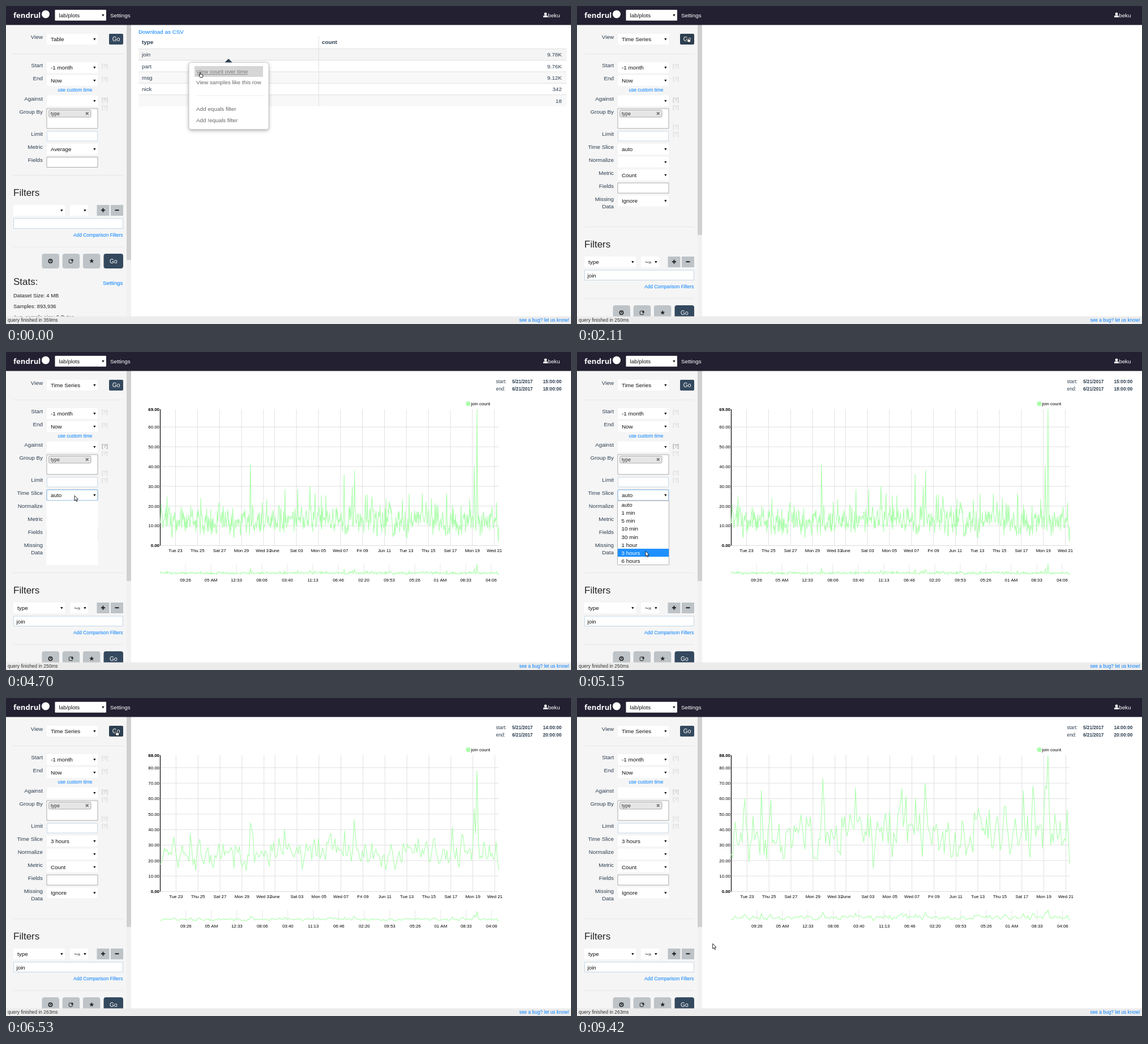
An HTML page with a canvas that plays this animation: 998 px wide and 561 px high, repeating every 9.46 s.

```html
<!DOCTYPE html>
<html lang="en">
<head>
<meta charset="utf-8">
<title>Query dashboard</title>
<style>
html, body { margin: 0; width: 100%; height: 100%; overflow: hidden; background: #fff; }
canvas { display: block; width: 100vw; height: 100vh; }
</style>
</head>
<body>
<canvas id="stage"></canvas>
<script>
const W = 998, H = 561, LOOP = 9460;
const canvas = document.getElementById('stage');
const ctx = canvas.getContext('2d');
const dpr = window.devicePixelRatio || 1;
canvas.width = W * dpr;
canvas.height = H * dpr;

const INK = '#2c3e50', LINK = '#007fff', NAVY = '#34495e', GREY = '#bdc3c7', GREEN = '#aaffaa';
const GRID = '#e1e1e1', DARK = '#222', FAINT = '#cfcfcf';
const SANS = '"Liberation Sans", Arial, sans-serif';
const BODY = 9.85, SMALL = 8.4;
const LEFT = 272.5, RIGHT = 870.5, TOP = 101, BOTTOM = 341.5;

// Moments at which the state changes
const PICK = 370, HOVER_GO = 1240, RUN = 2110, SHOWN = 2710, RELEASE = 3050,
  OPEN = 4700, CHOOSE = 5450, RERUN = 6360, LEAVE = 7030;

const mix = (a, b, f) => a + (b - a) * f;

// Drawing helpers
function rect(x, y, w, h, fill) {
  ctx.fillStyle = fill;
  ctx.fillRect(x, y, w, h);
}
function box(x, y, w, h, fill, stroke, r = 0) {
  ctx.beginPath();
  ctx.roundRect(x, y, w, h, r);
  if (fill) { ctx.fillStyle = fill; ctx.fill(); }
  if (stroke) { ctx.strokeStyle = stroke; ctx.lineWidth = 1; ctx.stroke(); }
}
function line(x1, y1, x2, y2, color, width = 1) {
  ctx.strokeStyle = color;
  ctx.lineWidth = width;
  ctx.beginPath();
  ctx.moveTo(x1, y1);
  ctx.lineTo(x2, y2);
  ctx.stroke();
}
function disc(x, y, r, fill) {
  ctx.fillStyle = fill;
  ctx.beginPath();
  ctx.arc(x, y, r, 0, 7);
  ctx.fill();
}
function triangle(x, y, halfWidth, height, fill) {
  ctx.fillStyle = fill;
  ctx.beginPath();
  ctx.moveTo(x - halfWidth, y);
  ctx.lineTo(x + halfWidth, y);
  ctx.lineTo(x, y + height);
  ctx.fill();
}
function text(s, x, y, { size = BODY, color = INK, align = 'left', bold = false, family = SANS } = {}) {
  ctx.font = `${bold ? 'bold ' : ''}${size}px ${family}`;
  ctx.fillStyle = color;
  ctx.textAlign = align;
  ctx.fillText(s, x, y);
}

// Seeded noise around a mean, with rare bursts and a few named peaks
function series({ count, mean, spread, burst, floor, seed, peaks }) {
  const rnd = () => (seed = (seed * 16807) % 2147483647) / 2147483647;
  let drift = 0;
  const values = Array.from({ length: count }, () => {
    drift = 0.35 * drift + (rnd() + rnd() + rnd() - 1.5) * spread;
    return Math.max(floor, mean + drift + burst * rnd() ** 12);
  });
  for (const [x, peak] of peaks) {
    const i = Math.round((x - LEFT) / (RIGHT - LEFT) * (count - 1));
    for (const k of [i - 1, i + 1]) if (k in values) values[k] = mix(values[k], peak, 0.35);
    values[i] = peak;
  }
  return values;
}

const hourly = {
  max: 69, min: 2, shift: 0, from: '15:00:00', to: '18:00:00',
  values: series({ count: 745, mean: 12, spread: 6.5, burst: 14, floor: 4, seed: 4711,
    peaks: [[432, 41], [537, 30], [597, 36], [616, 38], [827, 40], [832, 69], [870, 2]] })
};
const coarse = {
  max: 88, min: 15, shift: 0.8, from: '14:00:00', to: '20:00:00',
  values: series({ count: 249, mean: 37, spread: 14, burst: 22, floor: 21, seed: 2024,
    peaks: [[297, 60], [304, 19], [433, 73], [492, 67], [523, 15], [615, 70], [788, 65],
      [805, 68], [826, 68], [832, 88], [870, 18]] })
};

function dayLabel(date) {
  if (date.getUTCDate() === 1) return 'June';
  const name = date.getUTCDay() === 0 ? { month: 'short' } : { weekday: 'short' };
  return date.toLocaleDateString('en-US', { ...name, timeZone: 'UTC' }) +
    ' ' + String(date.getUTCDate()).padStart(2, '0');
}
function hourLabel(i) {
  const seconds = (34000 + 27200 * i) % 43200;
  const pad = n => String(Math.floor(n)).padStart(2, '0');
  const hour = pad(seconds / 3600 || 12), minute = pad(seconds % 3600 / 60);
  return minute === '00' ? hour + ' AM' : `${hour === '00' ? 12 : hour}:${minute}`;
}

function plot(values, toY) {
  ctx.strokeStyle = GREEN;
  ctx.lineWidth = 1.1;
  ctx.lineJoin = 'round';
  ctx.beginPath();
  values.forEach((v, i) => ctx.lineTo(mix(LEFT, RIGHT, i / (values.length - 1)), toY(v)));
  ctx.stroke();
}

function drawChart(c, values, alpha) {
  const toY = v => mix(BOTTOM, TOP, v / c.max);
  const tick = { size: 7.9, color: '#000', align: 'center' };
  const side = { ...tick, align: 'right' };
  ctx.globalAlpha = alpha;
  for (let v = 10; v < c.max - 5; v += 10) {
    line(LEFT, toY(v), RIGHT, toY(v), GRID);
    text(v.toFixed(2), 271, toY(v) + 2.8, side);
  }
  for (let d = 0; d < 30; d++) {
    const date = new Date(Date.UTC(2017, 4, 23 + d));
    if (date.getUTCDate() % 2 === 0) continue;
    const x = 299.5 + c.shift + 19.42 * d;
    line(x, TOP, x, BOTTOM, GRID);
    text(dayLabel(date), x, 353.3, tick);
  }
  line(LEFT, BOTTOM, RIGHT, BOTTOM, '#dcdcdc');
  line(LEFT, TOP, LEFT, BOTTOM, DARK, 1.4);
  for (const v of [c.max, 0]) text(v.toFixed(2), 271, toY(v) + 2.7, { ...side, bold: true });
  plot(values, toY);

  for (let i = 0; i < 13; i++) {
    const x = 317 + c.shift + 45 * i;
    line(x, 374, x, 393, '#e6e6e6');
    text(hourLabel(i), x, 405, tick);
  }
  plot(values, v => mix(393, 374, (v - c.min) / (c.max - c.min)));

  disc(816.5, 91.3, 4.1, GREEN);
  text('join count', 821.5, 94.2, { ...tick, align: 'left' });
  ctx.globalAlpha = 1;
}

function drawDates(c) {
  const row = (name, day, time, y) => {
    text(name, 865.5, y, { size: SMALL });
    text(day, 894, y, { size: 8.2, bold: true });
    text(time, 981.3, y, { size: 8.2, bold: true, align: 'right' });
  };
  row('start:', '5/21/2017', c.from, 54.5);
  row('end:', '6/21/2017', c.to, 68);
}

function drawTable(hover) {
  text('Download as CSV', 234, 49, { color: LINK });
  text('type', 240, 67.3, { bold: true });
  text('count', 558, 67.3, { bold: true });
  const rows = [['join', '9.78K'], ['part', '9.76K'], ['msg', '9.12K'], ['nick', '342'], ['', '18']];
  rows.forEach(([name, count], i) => {
    const y = 75.5 + i * 20.3;
    rect(234, y, 756, 20.3, hover === i ? '#f4f4f4' : i % 2 ? '#fff' : '#f8f8f8');
    line(234, y, 990, y, GRID);
    text(name, 240, y + 13.8);
    text(count, 981.7, y + 13.8, { align: 'right' });
  });
  line(552.5, 53, 552.5, 177, GRID);
}

function drawPopup() {
  ctx.save();
  ctx.shadowColor = 'rgba(0,0,0,.35)';
  ctx.shadowBlur = 6 * dpr;
  ctx.shadowOffsetY = 2 * dpr;
  box(323, 99.5, 141, 118, '#fff', null, 4);
  ctx.restore();
  box(323, 99.5, 141, 118, null, '#ccc', 4);
  triangle(393, 99.5, 6.5, -6.5, INK);
  rect(333, 106, 121, 19, '#d6d6d6');
  const gray = { color: '#666' };
  text('View count over time', 336, 119, { color: '#777' });
  line(336, 120.8, 427, 120.8, '#777', 0.8);
  text('View samples like this row', 336, 138.3, gray);
  line(336, 158, 457, 158, '#ececec');
  text('Add equals filter', 336, 185, gray);
  text('Add !equals filter', 336, 204.8, gray);
}

// Sidebar widgets, placed by their vertical centre
function select(x, y, w, label, stroke) {
  box(x, y - 9.5, w, 19, '#fff', stroke, 1);
  if (label) text(label, x + 7, y + 3.7, { color: '#111' });
  triangle(x + w - 5.6, y - 1.4, 2.2, 3.6, '#111');
}
function label(name, y) {
  text(name, 65, y - 0.1, { align: 'right' });
}
function choice(name, y, value, stroke) {
  label(name, y);
  select(72, y, 90, value, stroke);
}
function help(y, color = FAINT) {
  text('[?]', 174.5, y + 3.6, { color, align: 'center' });
}
function rule(y) {
  line(13, y, 207, y, '#e6e6e6');
}
function goButton(x, y, w, h, r, fill = NAVY) {
  box(x, y, w, h, fill, null, r);
  text('Go', x + w / 2, y + h / 2 + 3.7, { size: 10.3, color: '#fff', align: 'center' });
}
function signButton(x, y, plus) {
  rect(x, y, 22, 19, GREY);
  rect(x + 7.5, y + 8.2, 7, 2, DARK);
  if (plus) rect(x + 10, y + 5.7, 2, 7, DARK);
}
function star(x, y, r) {
  ctx.fillStyle = DARK;
  ctx.beginPath();
  for (let i = 0; i < 10; i++) {
    const d = i % 2 ? r * 0.4 : r, a = i * Math.PI / 5;
    ctx.lineTo(x + d * Math.sin(a), y - d * Math.cos(a));
  }
  ctx.fill();
}

function drawFilters(filled) {
  text('Filters', 13, 335.4, { size: 17, color: DARK });
  select(13, 360.5, 91, filled ? 'type' : '');
  select(113, 360.5, 32, filled ? '~=' : '');
  signButton(160.5, 351, true);
  signButton(185, 351, false);
  box(13.5, 375, 193, 17.5, '#fff', '#c3d6e4');
  if (filled) text('join', 18.5, 387.5, { color: '#111' });
  text('Add Comparison Filters', 206.5, 406.8, { size: SMALL, color: LINK, align: 'right' });
  rule(425);

  for (let i = 0; i < 3; i++) box(63.5 + 36.2 * i, 437, 30.5, 26, GREY, null, 4);
  disc(78.5, 450, 4, DARK);
  disc(78.5, 450, 2.4, GREY);
  rect(77.8, 448, 1.6, 2.8, DARK);
  box(111.3, 447, 6, 6.4, null, DARK, 1.5);
  triangle(117, 449.8, 2.4, -4, DARK);
  star(151.3, 450, 4.4);
  goButton(172.5, 437, 34.5, 26, 4);
}

function drawStats() {
  text('Stats:', 13, 491.6, { size: 17, color: DARK });
  text('Settings', 206.5, 492.3, { color: LINK, align: 'right' });
  ['Dataset Size: 4 MB', 'Samples: 893,936', 'Avg. sample size: 5 Bytes'].forEach((s, i) =>
    text(s, 13, 514 + i * 19, { size: 9.4, color: DARK }));
}

function drawGroupBy() {
  label('Group By', 190.3);
  box(72, 181, 90, 35, '#fff', '#aaa');
  box(75.5, 183.5, 74.5, 12.5, '#e6e6e6', '#aaa', 2);
  text('type', 79, 192.7, { size: SMALL, color: '#333' });
  line(141, 187.3, 145.6, 192, '#777', 1.7);
  line(141, 192, 145.6, 187.3, '#777', 1.7);
}

function drawSidebar(t) {
  const timed = t >= PICK;
  rect(0, 33, 213, 515, '#f5f5f5');
  rect(213, 33, 8, 515, '#f1f1f1');
  rect(213, 33, 8, timed ? 371 : 415, '#d0d0d0');

  choice('View', 58.5, timed ? 'Time Series' : 'Table');
  goButton(182, 49, 25, 19, 2, overButton(t) ? INK : NAVY);
  rule(84.5);
  choice('Start', 108.5, '-1 month');
  choice('End', 131.4, 'Now');
  text('use custom time', 152.5, 150.6, { size: SMALL, color: LINK, align: 'right' });
  choice('Against', 167.3);
  drawGroupBy();
  label('Limit', 229.5);
  box(72.5, 221, 89, 17, '#fff', '#c9d9e6');

  const lit = t > 4000 && t < 5700;
  [105, 128, 178].forEach(y => help(y));
  help(165.5, lit ? '#888' : FAINT);
  if (!lit) help(164.5);

  let y = 252.5;
  if (timed) {
    [212, 225].forEach(at => help(at));
    const focus = t >= OPEN && t < RERUN ? '#6aa5e0' : null;
    choice('Time Slice', y, t < CHOOSE ? 'auto' : '3 hours', focus);
    choice('Normalize', y + 22.8, '');
    choice('Missing', y + 91.2, 'Ignore');
    label('Data', y + 104.2);
    y += 45.6;
  }
  choice('Metric', y, timed ? 'Count' : 'Average');
  label('Fields', y + 22.8);
  box(72, y + 14, 90, 18, '#fff', '#aaa');

  ctx.save();
  if (timed) ctx.translate(0, 91);
  rule(298.5);
  drawFilters(timed);
  if (!timed) drawStats();
  ctx.restore();
}

function drawOptions(t, pointerY) {
  const top = 262.5, step = 14.1;
  rect(71.5, top, 91, 113.5, '#fff');
  if (t < OPEN + 40) return;
  const names = ['auto', '1 min', '5 min', '10 min', '30 min', '1 hour', '3 hours', '6 hours'];
  const active = Math.max(0, Math.floor((pointerY - top) / step));
  names.forEach((name, i) => {
    const y = top + i * step;
    if (i === active) rect(72, y, 90, step, '#1e90ff');
    text(name, 78.5, y + 10.6, { color: i === active ? '#fff' : '#111' });
  });
  box(71.5, top, 91, 113, null, '#b5b5b5');
}

function drawBars(status) {
  rect(0, 0, W, 33.5, '#222031');
  text('fendrul', 13, 20.5, { size: 13.1, color: '#fff', bold: true, family: '"Open Sans", sans-serif' });
  disc(70, 14.5, 7, '#fff');
  select(86.5, 16.2, 90.5, 'lab/plots');
  text('Settings', 184, 19.8, { color: '#fff' });
  disc(953, 14, 2.4, '#fff');
  box(949, 16.5, 8, 3.5, '#fff', null, [2, 2, 0.5, 0.5]);
  text('beku', 978.5, 19.8, { color: '#fff', align: 'right' });

  rect(0, 547.5, W, 14, '#ececec');
  text(`query finished in ${status}ms`, 3, 557.2, { size: SMALL, color: '#333' });
  text('see a bug? let us know!', 994.5, 557, { size: SMALL, color: LINK, align: 'right' });
}

// Pointer: it rests, then glides to each next point
const linear = f => f, easeOut = f => Math.sin(f * Math.PI / 2);
const glides = [
  { from: PICK, to: 680, x: 251, y: 87, ease: linear },
  { from: 680, to: 1040, x: 193, y: 55, ease: easeOut },
  { from: 3790, to: 4550, x: 121, y: 253, ease: easeOut },
  { from: OPEN, to: 5190, x: 121, y: 352, ease: easeOut },
  { from: CHOOSE, to: 6010, x: 192, y: 65.5, ease: easeOut },
  { from: 6010, to: RERUN, x: 192, y: 57.5, ease: linear },
  { from: LEAVE, to: 7430, x: 204.5, y: 159, ease: linear },
  { from: 7430, to: 9130, x: 239.7, y: 433.3, ease: easeOut }
];
function pointerAt(t) {
  let x = 340, y = 117;
  for (const g of glides) {
    if (t < g.from) break;
    const f = g.ease(Math.min(1, (t - g.from) / (g.to - g.from)));
    x = mix(x, g.x, f);
    y = mix(y, g.y, f);
  }
  return [x, y];
}
function overButton(t) {
  return (t >= HOVER_GO && t < RELEASE) || (t >= RERUN && t < LEAVE);
}

const arrow = new Path2D('M0 0V9L2.1 7.2 3.6 10.4 5 9.8 3.6 6.7 6.3 6.5Z');
const hand = new Path2D('M2.2.5H3.5L3.7 3.4 7.5 4.2 8 5.2 7.2 9H3L.6 5.5 1 4.8 2.2 5.6Z');
function drawPointer(x, y, shape) {
  ctx.save();
  ctx.translate(x, y);
  ctx.fillStyle = '#fff';
  ctx.strokeStyle = '#111';
  ctx.lineWidth = 0.9;
  ctx.fill(shape);
  ctx.stroke(shape);
  ctx.restore();
}

function drawResult(t) {
  if (t < RUN) {
    drawTable(t < PICK ? 0 : t < 1040 ? 1 : -1);
  } else if (t < RERUN) {
    const shown = (t - RUN - 90) / 280;
    if (shown <= 0) return;
    drawDates(hourly);
    drawChart(hourly, hourly.values, t < SHOWN ? Math.min(0.85, shown) : 1);
  } else {
    const f = Math.min(1, (t - RERUN) / 360);
    drawDates(coarse);
    drawChart(coarse, coarse.values.map((v, i) => mix(hourly.values[3 * i], v, f)), 1);
  }
}

function draw(t) {
  ctx.setTransform(dpr, 0, 0, dpr, 0, 0);
  rect(0, 0, W, H, '#fff');
  const [x, y] = pointerAt(t);
  drawResult(t);
  drawSidebar(t);
  if (t >= OPEN && t < CHOOSE) drawOptions(t, y);
  if (t < PICK) drawPopup();
  drawBars(t < RUN ? 359 : t < RERUN ? 250 : 263);
  drawPointer(x, y, t < PICK || overButton(t) ? hand : arrow);
}

const start = performance.now();
function tick() {
  draw((performance.now() - start) % LOOP);
  requestAnimationFrame(tick);
}
tick();
</script>
</body>
</html>
```
